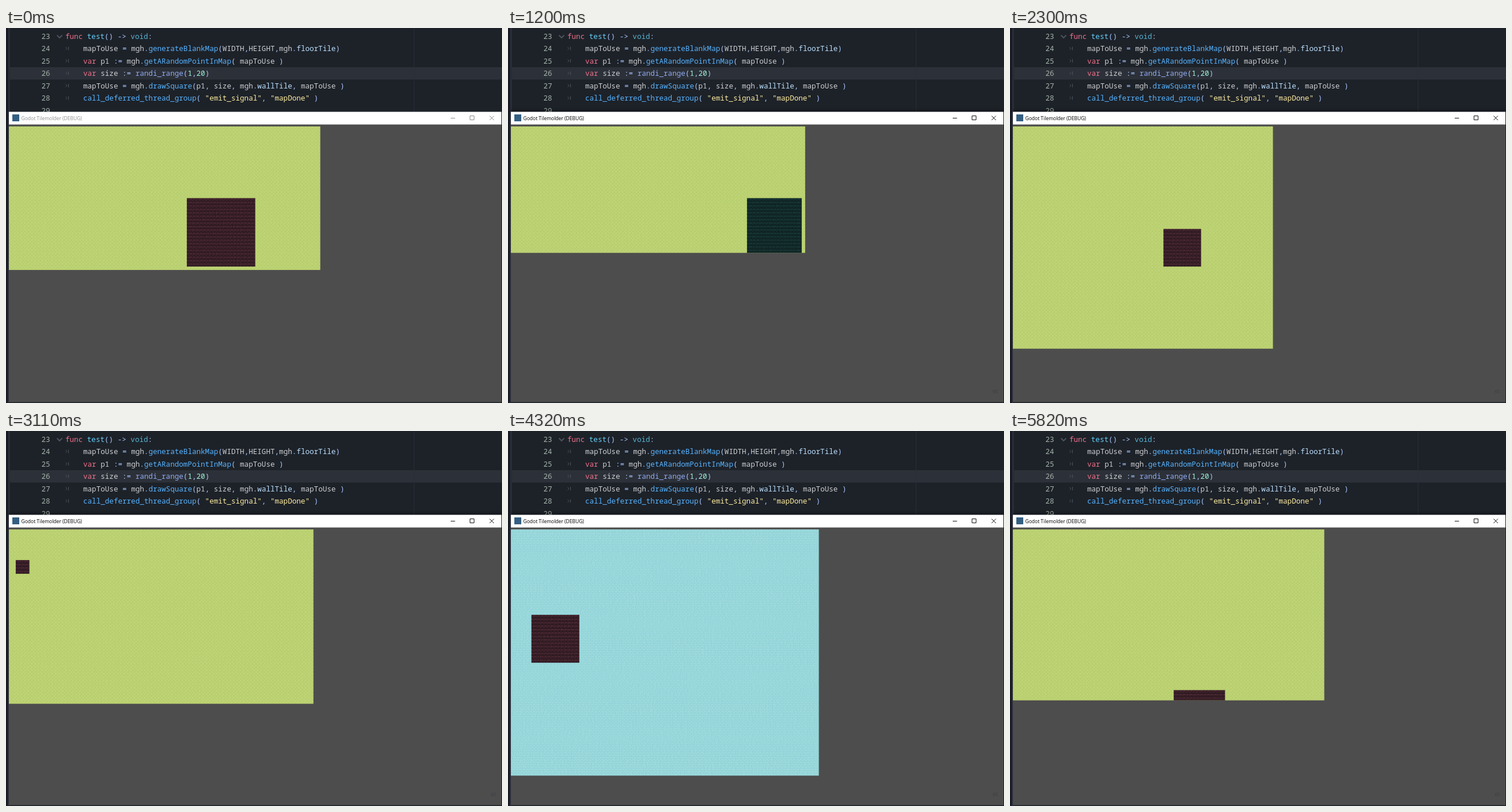
An HTML page with a canvas for the animation above (6.22 s loop, 861 px wide and 651 px high).

```html
<!DOCTYPE html>
<html lang="en">
<head>
<meta charset="utf-8">
<title>Map generator</title>
<style>
  html, body { margin: 0; width: 100%; height: 100%; overflow: hidden; background: #1d2229; }
  svg, canvas { position: absolute; left: 0; top: 0; display: block; }
  .code text { font: 12.6px "Noto Sans Mono", "DejaVu Sans Mono", monospace; white-space: pre; fill: #cdcfd2; }
  .code .num { fill: #a6b3aa; }
  .key { fill: #f0708a; }
  .def { fill: #66d0fa; }
  .type { fill: #58b4d0; }
  .fn { fill: #57b3ff; }
  .core { fill: #8fabf2; }
  .op { fill: #abc9ff; }
  .mem { fill: #bce0ff; }
  .val { fill: #a1f5dc; }
  .str { fill: #ffeda1; }
  .mark { fill: none; stroke: #4d525b; stroke-width: 1; }
  .bar text { font: 8.5px "Open Sans", "Noto Sans", sans-serif; fill: #000; }
  .bar path { fill: none; stroke: #111; stroke-width: 1; }
  .idle .bar text { fill: #8f8f8f; }
  .idle .bar path { stroke: #8c8c8c; }
  .idle .live { display: none; }
</style>
</head>
<body>
<svg id="scene" class="idle" width="861" height="651" viewBox="0 0 861 651">
  <defs>
    <linearGradient id="shade" x2="0" y2="1">
      <stop offset="0" stop-color="#000" stop-opacity="0"/>
      <stop offset="1" stop-color="#000" stop-opacity=".3"/>
    </linearGradient>
  </defs>
  <rect width="861" height="651" fill="#1d2229"/>
  <rect x="7" y="68" width="854" height="21.5" fill="#2c3038"/>
  <path d="M708.5 0V146" stroke="#292e36"/>
  <rect width="5" height="651" fill="#191c24"/>
  <rect x="4" width="2.5" height="146" fill="#2c303c"/>
  <rect x="3" y="146" width="2" height="505" fill="#2b2f3b"/>

  <g class="code" id="code"></g>

  <rect class="live" x="5" y="138" width="856" height="8" fill="url(#shade)"/>
  <rect x="5" y="167" width="855" height="482" fill="#4d4d4d"/>
  <path d="M5 649.5H860" stroke="#33363c"/>
  <g class="bar">
    <rect x="5" y="145.5" width="855" height="22" fill="#fff"/>
    <rect x="11" y="150" width="12" height="12" fill="#345f82"/>
    <text x="26.5" y="159.6">Godot Tilemolder (DEBUG)</text>
    <path d="M772 156.5H779.5M805.5 152.5H812.5V159.5H805.5ZM839.5 152.5L847 160M847 152.5L839.5 160"/>
  </g>
  <path class="live" d="M845 628L842 631L845 634M850 628L846 631L850 634" fill="none" stroke="#424349" stroke-width="1.5"/>
</svg>
<canvas id="map" width="861" height="651"></canvas>

<script>
const LOOP = 6220, TILE = 5.94, LEFT = 5, TOP = 170.6;

// Each line: indent column, then [class, text] runs
const lines = [
  [103, ["key", "func "], ["def", "test"], ["op", "() -> "], ["type", "void"], ["op", ":"]],
  [134, ["", "mapToUse "], ["op", "= "], ["", "mgh"], ["op", "."], ["fn", "generateBlankMap"], ["op", "("],
    ["", "WIDTH"], ["op", ","], ["", "HEIGHT"], ["op", ","], ["", "mgh"], ["op", "."], ["mem", "floorTile"], ["op", ")"]],
  [134, ["key", "var "], ["", "p1 "], ["op", ":= "], ["", "mgh"], ["op", "."], ["fn", "getARandomPointInMap"],
    ["op", "( "], ["", "mapToUse "], ["op", ")"]],
  [134, ["key", "var "], ["", "size "], ["op", ":= "], ["core", "randi_range"], ["op", "("], ["val", "1"],
    ["op", ","], ["val", "20"], ["op", ")"]],
  [134, ["", "mapToUse "], ["op", "= "], ["", "mgh"], ["op", "."], ["fn", "drawSquare"], ["op", "("], ["", "p1"],
    ["op", ", "], ["", "size"], ["op", ", "], ["", "mgh"], ["op", "."], ["mem", "wallTile"], ["op", ", "],
    ["", "mapToUse "], ["op", ")"]],
  [134, ["fn", "call_deferred_thread_group"], ["op", "( "], ["str", '"emit_signal"'], ["op", ", "],
    ["str", '"mapDone" '], ["op", ")"]],
  [134]
];

const escape = s => s.replace(/&/g, "&amp;").replace(/</g, "&lt;").replace(/>/g, "&gt;");
document.getElementById("code").innerHTML = lines.map(([x, ...runs], i) => {
  const mid = 14 + i * 21.5, base = mid + 4.6;
  const spans = runs.map(([c, s]) => `<tspan class="${c}">${escape(s)}</tspan>`).join("");
  const mark = i === 0
    ? `<path class="mark" style="stroke-width:2" d="M88.5 12.5L93 17L97.5 12.5"/>`
    : runs.length ? `<path class="mark" d="M103.5 ${mid - 2.5}l2.5 2.5l-2.5 2.5M108.5 ${mid - 3}v6"/>` : "";
  return `<text class="num" x="61.5" y="${base}">${23 + i}</text>${mark}<text x="${x}" y="${base}">${spans}</text>`;
}).join("");

function random(seed) {
  return () => (seed = (seed * 16807) % 2147483647) / 2147483647;
}

// Builds a sheet of tiles; paint() works in 16 x 16 units
function sheet(base, paint) {
  const c = document.createElement("canvas");
  c.width = 550;
  c.height = 440;
  const g = c.getContext("2d"), rnd = random(77);
  g.fillStyle = base;
  g.fillRect(0, 0, c.width, c.height);
  g.scale(TILE / 16, TILE / 16);
  for (let y = 0; y < 74; y++)
    for (let x = 0; x < 92; x++) {
      g.save();
      g.translate(x * 16, y * 16);
      paint(g, rnd);
      g.restore();
    }
  return g.createPattern(c, "no-repeat");
}

function grass(g, rnd) {
  g.fillStyle = "#a5bd5b";
  g.fillRect(rnd() * 3, 3, 4, 2);
  g.fillRect(8 + rnd() * 4, 10, 4, 2);
  g.fillStyle = "#c9dc84";
  g.fillRect(9, 2 + rnd() * 3, 4, 2);
}

function ice(g, rnd) {
  g.fillStyle = "#7cc3cd";
  g.fillRect(0, 6, 16, 2);
  g.fillRect(0, 14, 16, 2);
  g.fillRect(rnd() < .8 ? 4 : 10, 0, 1, 6);
  g.fillRect(rnd() < .8 ? 12 : 7, 8, 1, 6);
}

const bricks = (main, dim) => (g, rnd) => {
  const gap = rnd() < .8 ? 9 : 5;
  g.fillStyle = main;
  g.fillRect(0, 2, gap, 4);
  g.fillRect(gap + 2, 2, 14 - gap, 4);
  g.fillStyle = dim;
  g.fillRect(0, 9, 3, 4);
  g.fillRect(5, 9, 11, 4);
};

const fills = {
  grass: sheet("#bcd273", grass),
  ice: sheet("#a3dfe0", ice),
  plum: sheet("#26151c", bricks("#60343f", "#472833")),
  teal: sheet("#0d1f20", bricks("#1e4541", "#16302f"))
};

// start, floor, columns, rows, wall, wall column, wall row, wall size
const maps = [
  [0, "grass", 91, 42, "plum", 52, 21, 20],
  [400, "grass", 58, 46, "plum", 20, 14, 9],
  [800, "ice", 64, 31, "teal", 38, 8, 12],
  [1200, "grass", 86, 37, "teal", 69, 21, 16],
  [1600, "grass", 86, 33, "plum", 30, 10, 7],
  [1900, "ice", 84, 73, "teal", 81, 35, 3],
  [2300, "grass", 76, 65, "plum", 44, 30, 11],
  [2700, "grass", 72, 53, "teal", 15, 20, 17],
  [3110, "grass", 89, 51, "plum", 2, 9, 4],
  [3510, "ice", 66, 44, "plum", 35, 18, 8],
  [3910, "grass", 58, 49, "teal", 22, 12, 13],
  [4320, "ice", 90, 72, "plum", 6, 25, 14],
  [4720, "grass", 80, 69, "teal", 40, 38, 10],
  [5120, "grass", 87, 60, "plum", 23, 4, 12],
  [5520, "ice", 74, 46, "teal", 50, 20, 6],
  [5820, "grass", 91, 50, "plum", 47, 47, 15]
];

const scene = document.getElementById("scene");
const ctx = document.getElementById("map").getContext("2d");
let shown = null;

function area(fill, x, y, w, h) {
  ctx.fillStyle = fills[fill];
  ctx.fillRect(x * TILE, y * TILE, w * TILE, h * TILE);
}

function drawMap([, floor, cols, rows, wall, x, y, size]) {
  ctx.setTransform(1, 0, 0, 1, 0, 0);
  ctx.clearRect(0, 0, 861, 651);
  ctx.translate(LEFT, TOP);
  area(floor, 0, 0, cols, rows);
  area(wall, x, y, Math.min(size, cols - x), Math.min(size, rows - y));
}

function tick() {
  const t = performance.now() % LOOP;
  const map = maps.filter(m => m[0] <= t).pop();
  if (map !== shown) drawMap(shown = map);
  scene.classList.toggle("idle", t < 100);
  requestAnimationFrame(tick);
}
tick();
</script>
</body>
</html>
```
